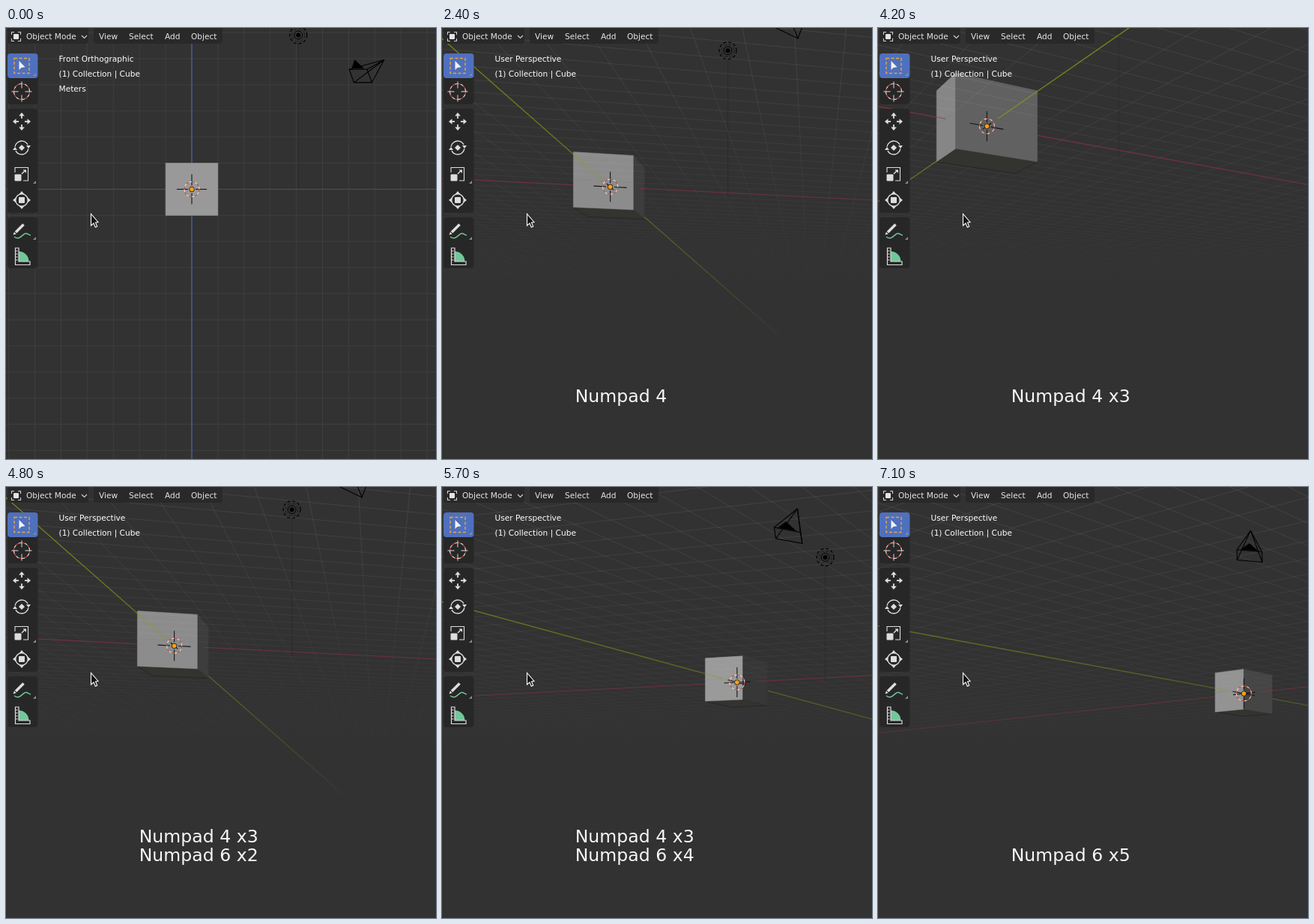
An HTML page with a canvas for the animation above (7200 ms loop, 574 px wide and 576 px high).

```html
<!DOCTYPE html>
<html lang="en">
<head>
<meta charset="utf-8">
<title>Orbiting the viewport with the numpad</title>
<style>
html, body { margin: 0; width: 100%; height: 100%; overflow: hidden; background: #323232; }
canvas { display: block; }
</style>
</head>
<body>
<canvas id="stage" width="574" height="576"></canvas>
<script>
const g = document.getElementById('stage').getContext('2d');
const TAU = Math.PI * 2, LOOP = 7200, STEP = Math.PI / 12;

// Viewport camera: level, below the floor, orbiting a pivot to the right of the cube.
const FOCAL = 1104, DIST = 31.63, CX = 790, HORIZON = 450, EYE_Z = -6.705;
const PIVOT = [15.53, -3.65], ORTHO = 34.9;
const LAMP = [4.076, 1.005, 5.904];

// Key presses: time and orbit direction.
const PRESSES = [[2100, 1], [2450, 1], [2750, 1], [4250, -1], [4550, -1], [5050, -1], [5400, -1], [5950, -1]];
const SMOOTH = 200, CAPTION_END = 6000;
// Face brightness by azimuth of its normal, -60 to 105 degrees in steps of 15.
const SHADES = [120, 133, 146, 153, 152, 139, 118, 96, 68, 54, 54, 60];

let ortho, cos, sin, theta;

const depth = (x, y) => DIST + (x - PIVOT[0]) * sin + (y - PIVOT[1]) * cos;

function project([x, y, z]) {
  if (ortho) return [248 + x * ORTHO, 215.5 - z * ORTHO];
  const scale = FOCAL / depth(x, y);
  const side = (x - PIVOT[0]) * cos - (y - PIVOT[1]) * sin;
  return [CX + side * scale, HORIZON - (z - EYE_Z) * scale];
}

function path(points, close) {
  g.beginPath();
  points.forEach(p => g.lineTo(p[0], p[1]));
  if (close) g.closePath();
}
function line(points, color, width = 1, close = false) {
  path(points, close);
  g.strokeStyle = color;
  g.lineWidth = width;
  g.stroke();
}
function fill(points, color) {
  path(points, true);
  g.fillStyle = color;
  g.fill();
}
function box(x, y, w, h, r, color) {
  g.beginPath();
  g.roundRect(x, y, w, h, r);
  g.fillStyle = color;
  g.fill();
}
function arc(x, y, r, color, width = 1, from = 0, to = TAU) {
  g.beginPath();
  g.arc(x, y, r, from, to);
  g.strokeStyle = color;
  g.lineWidth = width;
  g.stroke();
}
function disc(x, y, r, color) {
  g.beginPath();
  g.arc(x, y, r, 0, TAU);
  g.fillStyle = color;
  g.fill();
}
function text(str, x, y, size = 10.6, color = '#e6e6e6') {
  g.font = size + 'px "DejaVu Sans", sans-serif';
  g.fillStyle = color;
  g.fillText(str, x, y);
}
function ring(x, y, r, width) {
  for (let i = 0; i < 16; i++)
    arc(x, y, r, i % 2 ? '#e6dcda' : '#c9473f', width, i * TAU / 16, (i + 1) * TAU / 16);
}

// Floor lines fade towards the horizon.
function fadeTo(rgb, alpha) {
  const grad = g.createLinearGradient(0, 0, 0, HORIZON);
  for (let i = 0; i <= 20; i++) {
    const slope = (1 - i / 20) * HORIZON / FOCAL;
    grad.addColorStop(i / 20, `rgba(${rgb},${Math.max(0, alpha(1 - (1 - slope) ** 4))})`);
  }
  return grad;
}
const gridFade = fadeTo('255,255,255', f => 0.11 * (f * f - 0.07));
const redFade = fadeTo('165,48,70', f => f - 0.1);
const greenFade = fadeTo('135,160,20', f => f - 0.1);

function floorLine(alongX, n, color, width) {
  const at = t => alongX ? [t, n, 0] : [n, t, 0];
  let a = -400, b = 400;
  const [da, db] = [a, b].map(t => depth(...at(t)));
  const cut = a + (b - a) * (1 - da) / (db - da);
  if (da < 1 && db < 1) return;
  if (da < 1) a = cut;
  if (db < 1) b = cut;
  line([project(at(a)), project(at(b))], color, width);
}

function floor() {
  for (let n = -90; n <= 110; n++) {
    if (!n) continue;
    floorLine(true, n, gridFade);
    floorLine(false, n, gridFade);
  }
  floorLine(true, 0, redFade, 1.2);
  floorLine(false, 0, greenFade, 1.4);
}

function orthoGrid() {
  for (let n = -10; n <= 10; n++) {
    const [x, y] = project([n, 0, -n]);
    line([[x, 0], [x, 576]], '#3e3e3e');
    line([[0, y], [574, y]], '#3e3e3e');
  }
  const [x, y] = project([0, 0, 0]);
  line([[0, y], [574, y]], '#7a3f49', 1.2);
  line([[x, 0], [x, 576]], '#4463a5', 1.3);
}

function shade(angle) {
  const i = Math.max(0, Math.min(SHADES.length - 1.001, angle / STEP + 4)), k = Math.floor(i);
  return Math.round(SHADES[k] + (SHADES[k + 1] - SHADES[k]) * (i - k));
}

function cubeSides(low, high) {
  const corners = [[-1, 1], [-1, -1], [1, -1], [1, 1]];
  for (let i = 0; i < 4; i++) {
    const p = corners[i], q = corners[(i + 1) % 4];
    const quad = [[...p, high], [...q, high], [...q, low], [...p, low]].map(project);
    if (quad[1][0] - quad[0][0] < 0.01) continue;
    const v = shade(theta + (i - 1) * Math.PI / 2);
    const color = `rgb(${v},${v + 1},${v})`;
    fill(quad, color);
    line(quad, color, 0.5, true);
  }
}

// The floor passes through the cube and hides in front of its upper half only.
function cubeAndFloor() {
  if (ortho) {
    orthoGrid();
    cubeSides(-1, 1);
    return;
  }
  cubeSides(0, 1);
  floor();
  const base = [[-1, -1, -1], [1, -1, -1], [1, 1, -1], [-1, 1, -1]].map(project);
  fill(base, '#33342f');
  line(base, 'rgba(20,20,18,.4)', 1, true);
  cubeSides(-1, 0);
}

function lamp() {
  const [x, y] = project(LAMP);
  line([[x, y + 12], project([LAMP[0], LAMP[1], 0])], 'rgba(0,0,0,.16)');
  disc(x, y, 3, '#000');
  arc(x, y, 5.5, '#000');
  g.setLineDash([4, 2.8]);
  arc(x, y, 11.5, '#000', 1.2);
  arc(x, y, 8.5, 'rgba(0,0,0,.6)', 0.8);
  g.setLineDash([]);
}

function cameraObject() {
  const pos = [7.359, -6.926, 4.958];
  const right = [0.686, 0.7276, 0], up = [-0.324, 0.3055, 0.8954], ahead = [-0.6516, 0.6142, -0.4453];
  const at = (u, v) => project(pos.map((p, i) => p + right[i] * u + up[i] * v + ahead[i] * 1.389));
  const apex = project(pos);
  const frame = [at(-0.5, 0.281), at(0.5, 0.281), at(0.5, -0.281), at(-0.5, -0.281)];
  line(frame, '#000', 1.1, true);
  frame.forEach(p => line([apex, p], '#000', 1.1));
  fill([at(-0.35, 0.31), at(0.35, 0.31), at(0, 0.694)], '#000');
}

function sceneCursor() {
  const [x, y] = project([0, 0, 0]);
  const unit = ortho ? ORTHO : FOCAL / depth(0, 0);
  for (let axis = 0; axis < 3; axis++)
    for (const sign of [-1, 1]) {
      const at = r => project([0, 1, 2].map(i => i === axis ? sign * r / unit : 0));
      line([at(5), at(20)], '#15151a', 1.1);
    }
  ring(x, y, 10, 1.1);
  disc(x, y, 3.6, '#1a1a1a');
  disc(x, y, 2.8, '#ffa014');
}

// Draws the same part four times, a quarter turn apart.
function quarters(x, y, draw) {
  for (let i = 0; i < 4; i++) {
    g.save();
    g.translate(x, y);
    g.rotate(i * TAU / 4);
    draw();
    g.restore();
  }
}

function toolbar() {
  const ink = '#dedede';
  [[34, 68], [108, 139], [253, 68]].forEach(([y, h]) => box(2, y, 40.5, h, 4, '#272727'));
  box(2, 34, 40.5, 33, 4, '#4f70bd');
  [64, 208, 283].forEach(y => fill([[40, y - 4], [40, y], [36, y]], '#8c8c8c'));

  // Select
  g.setLineDash([4, 2.5]);
  line([[11, 40.5], [31, 40.5], [31, 60.5], [11, 60.5]], '#e8a545', 1.4, true);
  g.setLineDash([]);
  fill([[17.5, 44], [17.5, 56], [20.5, 53], [25.5, 52.3]], '#f2f2f2');

  // Cursor
  ring(21, 85, 10.5, 1.2);
  quarters(21, 85, () => line([[0, -13.5], [0, -4.5]], ink, 1));

  // Move
  quarters(21, 125, () => {
    fill([[0, -12], [3.8, -7.5], [-3.8, -7.5]], ink);
    line([[0, -8], [0, -4]], ink, 1.8);
  });

  // Rotate
  fill([[21, 156], [25, 160], [21, 164], [17, 160]], ink);
  arc(21, 160, 9, ink, 1.4, Math.PI * 1.05, Math.PI * 1.85);
  arc(21, 160, 9, ink, 1.4, Math.PI * 0.05, Math.PI * 0.85);
  fill([[27, 157], [33, 157], [30, 161]], ink);
  fill([[9, 163], [15, 163], [12, 159]], ink);

  // Scale
  line([[12, 193], [12, 186.5], [29.5, 186.5], [29.5, 204], [23, 204]], ink, 1.1);
  box(11.5, 195.5, 9, 9, 1, ink);
  line([[21, 195], [25, 191]], ink, 1.4);
  fill([[22.5, 189.5], [27, 189.5], [27, 194]], ink);

  // Transform
  arc(21, 230, 8.3, ink, 1.4);
  box(17, 226, 8, 8, 1, ink);
  quarters(21, 230, () => fill([[0, -12], [3.3, -8], [-3.3, -8]], ink));

  // Annotate
  line([[13, 273], [23.5, 262.5]], ink, 3.6);
  fill([[9.5, 276.5], [11, 272.5], [13.7, 275.2]], ink);
  g.beginPath();
  g.moveTo(11, 279);
  g.bezierCurveTo(18, 284, 21, 277, 25, 275);
  g.bezierCurveTo(28, 273, 30, 277, 33, 277);
  g.strokeStyle = '#72c79a';
  g.lineWidth = 1.5;
  g.stroke();

  // Measure
  g.beginPath();
  g.moveTo(17, 312);
  g.arc(17, 312, 13.5, -Math.PI / 2, 0);
  g.fillStyle = '#72c79a';
  g.fill();
  line([[12.5, 294], [17, 294], [17, 312], [32, 312], [32, 316.5], [12.5, 316.5]], ink, 1.2, true);
  for (let y = 298; y < 313; y += 4) line([[13, y], [15.5, y]], ink);
}

function header() {
  box(2, -4, 108, 25, 4, '#292929');
  box(117, -4, 172, 25, 4, '#292929');
  box(10, 8, 7, 7, 1, '#e4e4e4');
  quarters(13.5, 11.5, () => line([[-6, -2.5], [-6, -6], [-2.5, -6]], '#cfcfcf', 1.1));
  line([[101, 10], [104.5, 13.5], [108, 10]], '#d0d0d0', 1.2);
  text('Object Mode', 27, 15);
  [['View', 124], ['Select', 164], ['Add', 212], ['Object', 247]].forEach(([s, x]) => text(s, x, 15));
}

function pointer() {
  const shape = [[113.5, 248.5], [113.5, 264], [117, 261], [119.3, 266.2], [121.7, 265.2], [119.5, 260], [123, 259.5]];
  fill(shape, '#111');
  line(shape, '#fff', 1.1, true);
}

function captions(time) {
  const count = dir => PRESSES.filter(([at, d]) => d === dir && at <= time).length;
  const label = (key, n) => `Numpad ${key}` + (n > 1 ? ` x${n}` : '');
  const rows = [];
  if (count(1) && time < CAPTION_END) rows.push(label(4, count(1)));
  if (count(-1)) rows.push(label(6, count(-1)));
  rows.reverse().forEach((row, i) => text(row, 177.7, 500 - i * 25, 23.6, '#f6f6f6'));
}

function draw(time) {
  ortho = time < PRESSES[0][0];
  theta = 0;
  for (const [at, dir] of PRESSES) {
    const u = Math.max(0, Math.min(1, (time - at) / SMOOTH));
    theta += dir * STEP * u * u * (3 - 2 * u);
  }
  cos = Math.cos(theta);
  sin = Math.sin(theta);

  g.fillStyle = '#323232';
  g.fillRect(0, 0, 574, 576);
  cubeAndFloor();
  lamp();
  cameraObject();
  sceneCursor();
  header();
  toolbar();
  const info = ortho ? ['Front Orthographic', '(1) Collection | Cube', 'Meters'] : ['User Perspective', '(1) Collection | Cube'];
  info.forEach((s, i) => text(s, 70.5, 45 + i * 20, 10.6, '#fff'));
  captions(time);
  pointer();
}

const start = performance.now();
function tick() {
  draw((performance.now() - start) % LOOP);
  requestAnimationFrame(tick);
}
tick();
</script>
</body>
</html>
```
